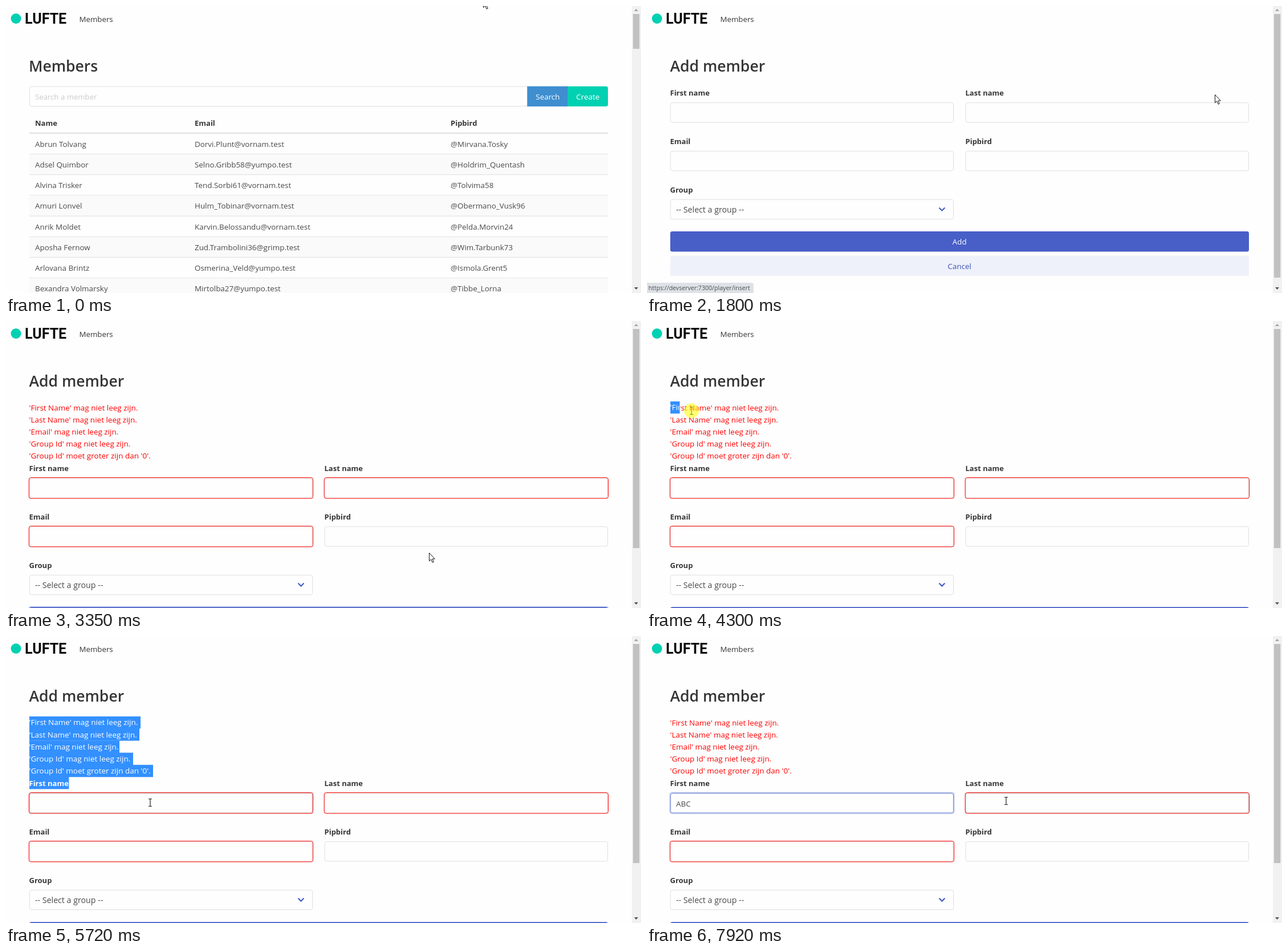
An HTML page for the animation above (7990 ms loop, 1114 px wide and 503 px high).

```html
<!DOCTYPE html>
<html lang="en">
<head>
<meta charset="utf-8">
<title>Members</title>
<style>
html, body { margin: 0; width: 100%; height: 100%; overflow: hidden; background: #fefefe; }
svg { display: block; }
text { font: 13.4px "Open Sans", "Noto Sans", sans-serif; fill: #4a4a4a; }
.b { font-weight: 700; font-size: 13px; fill: #363636; }
.title { font-weight: 600; font-size: 26.5px; fill: #363636; }
.brand { font: 700 25px Roboto, sans-serif; fill: #0a0a0a; }
.nav { font-size: 13.3px; fill: #363636; }
.hint { font-size: 13.2px; fill: #cacaca; }
.pick { font-size: 14.2px; }
.mid { text-anchor: middle; fill: #fff; }
.cancel { text-anchor: middle; fill: #3850b7; }
.err { font-size: 13.5px; fill: #f00; }
.sel { font-size: 13.5px; fill: #fff; }
.selb { font-weight: 700; font-size: 13px; fill: #fff; }
.url { font-size: 10.6px; fill: #4a4d51; }
</style>
</head>
<body>
<svg id="stage" width="1114" height="503" viewBox="0 0 1114 503"></svg>
<script>
// The page is shown at a zoom of ZOOM, so edges fall between pixels.
const LOOP = 7990, ZOOM = .884, BLUE = '#485fc7';
const ROW = 41 * ZOOM, LINE = 24 * ZOOM, H = 40 * ZOOM;
const LEFT = 40.8, COL2 = 558.7, WIDE = 1015.2, HALF = 497.3, TOP = 140.7, SHIFT = 5 * LINE;
const T = { status: 1270, form: 1730, statusOff: 2250, submit: 3210, errors: 3350,
  dragFrom: 4060, dragTo: 5250, focus: 5850 };

const people = [
  ['Abrun Tolvang', 'Dorvi.Plunt@vornam.test', '@Mirvana.Tosky'],
  ['Adsel Quimbor', 'Selno.Gribb58@yumpo.test', '@Holdrim_Quentash'],
  ['Alvina Trisker', 'Tend.Sorbi61@vornam.test', '@Tolvima58'],
  ['Amuri Lonvel', 'Hulm_Tobinar@vornam.test', '@Obermano_Vusk96'],
  ['Anrik Moldet', 'Karvin.Belossandu@vornam.test', '@Pelda.Morvin24'],
  ['Aposha Fernow', 'Zud.Trambolini36@grimp.test', '@Wim.Tarbunk73'],
  ['Arlovana Brintz', 'Osmerina_Veld@yumpo.test', '@Ismola.Grent5'],
  ['Bexandra Volmarsky', 'Mirtolba27@yumpo.test', '@Tibbe_Lorna']
];

// message, right edge of its selection
const messages = [
  ["'First Name' mag niet leeg zijn.", 236],
  ["'Last Name' mag niet leeg zijn.", 234],
  ["'Email' mag niet leeg zijn.", 199],
  ["'Group Id' mag niet leeg zijn.", 223],
  ["'Group Id' moet groter zijn dan '0'.", 258]
];

// pointer path: time, x, y
const path = [
  [0, 837, -12], [620, 837, -12], [800, 868, 110], [920, 910, 180], [990, 948, 194],
  [1130, 996, 155], [2040, 996, 155], [2550, 742, 406], [3490, 742, 406],
  [3690, 211, 131], [3850, 211, 131], [4050, 34, 144], [4150, 34, 144],
  [4650, 180, 188], [4720, 216, 195], [4920, 307, 241], [5290, 307, 241],
  [5490, 275, 322], [5700, 253, 292], [7540, 253, 292], [7720, 460, 277],
  [7920, 630, 289], [LOOP, 630, 289]
];

// mouse presses: from, to
const presses = [[1660, 1760], [T.submit, T.errors], [T.dragFrom, T.dragTo], [T.focus, 5925]];

const clamp = v => Math.max(0, Math.min(1, v));
const inside = (p, x, y, w, h) => p.x >= x && p.x < x + w && p.y >= y && p.y < y + h;

function pointerAt(t) {
  const i = Math.max(1, path.findIndex(k => k[0] > t));
  const [t0, x0, y0] = path[i - 1], [t1, x1, y1] = path[i];
  const k = clamp((t - t0) / (t1 - t0));
  return { x: x0 + (x1 - x0) * k, y: y0 + (y1 - y0) * k };
}

const text = (x, y, s, cls = '') => `<text x="${x}" y="${y}" class="${cls}">${s}</text>`;
const rect = (x, y, w, h, fill, extra = '') =>
  `<rect x="${x}" y="${y}" width="${w}" height="${h}" fill="${fill}" ${extra}/>`;
const frame = (x, y, w, h, color, line = ZOOM) =>
  rect(x + line / 2, y + line / 2, w - line, h - line, 'none',
    `stroke="${color}" stroke-width="${line}" rx="3.5"`);
const glow = (x, y, w) => frame(x - 1.8, y - 1.8, w + 3.6, H + 3.6, '#d1d7f1', 1.8);
const shape = (d, fill, extra = '') => `<path d="${d}" fill="${fill}" ${extra}/>`;

function field(x, y, p, { invalid, focus } = {}) {
  const hover = inside(p, x, y, HALF, H);
  let s = focus ? glow(x, y, HALF) : '';
  s += frame(x, y, HALF, H, focus ? BLUE : hover ? '#b5b5b5' : '#dbdbdb');
  if (invalid && !focus) s += frame(x - 1, y - 1, HALF + 2, H + 2, '#f00', 1);
  return s;
}

function chrome(thumbEnd) {
  return `<circle cx="17.5" cy="22" r="9" fill="#00d1b2"/>` +
    text(33, 31, 'LUFTE', 'brand') + text(128.5, 27.5, 'Members', 'nav') +
    rect(1098, 0, 16, 503, '#f1f1f1') +
    rect(1100, 14, 11.3, thumbEnd - 14, '#c1c1c1') +
    shape('M1102 9l3.5-4 3.5 4z', '#a3a3a3') + shape('M1102 493l3.5 4 3.5-4z', '#505050');
}

function listPage(p) {
  const search = 914.3, create = 985.2, right = LEFT + WIDE;
  const over = x => inside(p, x, TOP, 70.9, H);
  const green = over(create) ? '#00c4a7' : '#00d1b2';
  let s = chrome(75) + text(40, 115, 'Members', 'title') +
    frame(LEFT, TOP, search - LEFT + 3, H,
      inside(p, LEFT, TOP, search - LEFT, H) ? '#b5b5b5' : '#dbdbdb') +
    text(51, 164, 'Search a member', 'hint') +
    rect(create - 5, TOP, right - create + 5, H, green, 'rx="3.5"') +
    rect(search, TOP, create - search, H, over(search) ? '#3488ce' : '#3e8ed0') +
    text(950.4, 163.5, 'Search', 'mid') + text(1020.8, 163.5, 'Create', 'mid');
  const cols = [51, 331, 780];
  ['Name', 'Email', 'Pipbird'].forEach((h, i) => s += text(cols[i], 209.5, h, 'b'));
  people.forEach((row, r) => {
    const y = 223.6 + r * ROW;
    if (r % 2) s += rect(LEFT, y, WIDE, ROW, '#fafafa');
    s += rect(LEFT, y + ROW - ZOOM, WIDE, ZOOM, '#dbdbdb');
    row.forEach((c, i) => s += text(cols[i], y + 23, c));
  });
  return s + rect(LEFT, 221.9, WIDE, 2 * ZOOM, '#dbdbdb');
}

function selected(i, width, cls, s) {
  const h = LINE + .6;
  return `<svg x="${LEFT}" y="${TOP + i * LINE}" width="${width}" height="${h}">` +
    rect(0, 0, width, h, '#3390ff') + text(-.3, 15.8, s, cls) + '</svg>';
}

function selection(t) {
  if (t < T.dragFrom || t >= T.focus) return '';
  const head = pointerAt(Math.min(t - 70, 4920));
  const row = Math.floor((head.y - TOP) / LINE), all = head.y > 239;
  let s = '';
  messages.forEach(([m, end], i) => {
    const right = i < row || all ? end : i === row ? Math.min(end, head.x) : 0;
    if (right > LEFT) s += selected(i, right - LEFT, 'sel', m);
  });
  return all ? s + selected(5, 69.8, 'selb', 'First name') : s;
}

function formPage(t, p) {
  const invalid = t >= T.errors, dy = invalid ? SHIFT : 0, focus = t >= T.focus;
  let s = chrome(invalid ? 398 : 476) + text(40.5, 115, 'Add member', 'title');
  if (invalid) messages.forEach(([m], i) => s += text(40.5, 156.5 + i * LINE, m, 'err'));

  const label = (x, y, name) => text(x, y + dy, name, 'b');
  const y1 = 169 + dy, y2 = y1 + 96 * ZOOM, y3 = y2 + 96 * ZOOM;
  s += label(40.5, 156.5, 'First name') + label(558.5, 156.5, 'Last name') +
    label(40.5, 241.5, 'Email') + label(558.5, 241.5, 'Pipbird') + label(40.5, 326.5, 'Group') +
    field(LEFT, y1, p, { invalid, focus }) + field(COL2, y1, p, { invalid }) +
    field(LEFT, y2, p, { invalid }) + field(COL2, y2, p) + field(LEFT, y3, p) +
    text(51, 361.5 + dy, '-- Select a group --', 'pick') +
    shape(`M512.5 ${353.5 + dy}l5 5 5-5`, 'none', `stroke="${BLUE}" stroke-width="2.2"`);

  const y = 395.1 + dy, hover = inside(p, LEFT, y, WIDE, H), pressed = t >= T.submit && !invalid;
  if (t >= T.submit && t < T.dragFrom) s += glow(LEFT, y, WIDE);
  s += rect(LEFT, y, WIDE, H, pressed ? '#3a51bb' : hover ? '#3e56c4' : BLUE, 'rx="3.5"') +
    text(548.3, y + 23, 'Add', 'mid') +
    rect(LEFT, y + 48 * ZOOM, WIDE, H, '#eff1fa', 'rx="3.5"') +
    text(548.3, y + 65.4, 'Cancel', 'cancel');

  if (focus) {
    const typed = [6400, 6990, 7100].filter(k => t >= k).length;
    s += text(51, 298.5, 'ABC'.slice(0, typed));
    if (t < 7580) s += rect([52, 61, 69.5, 78][typed], 286, 1, 15, '#363636');
  }
  return s + selection(t);
}

function status(t) {
  if (t < T.status || t >= T.statusOff) return '';
  return `<g opacity="${clamp((t - T.status + 40) / 160)}">` +
    shape('M0 485h183q4 0 4 4v14H0z', '#dee1e6') +
    text(2.5, 498, 'https://devserver:7300/player/insert', 'url') + '</g>';
}

function cursorKind(t, p) {
  if (t < T.form) {
    if (inside(p, 914, TOP, 142, H)) return 'hand';
    return inside(p, LEFT, TOP, 873, H) ? 'beam' : 'arrow';
  }
  const failed = t >= T.errors, dy = failed ? SHIFT : 0;
  if (inside(p, LEFT, 395 + dy, WIDE, H)) return 'hand';
  const onField = [LEFT, COL2].some(x => [169, 254].some(y => inside(p, x, y + dy, HALF, H)));
  const onText = failed && messages.some(([, end], i) =>
    inside(p, LEFT, TOP + i * LINE, end - LEFT, LINE));
  return onField || onText ? 'beam' : 'arrow';
}

const cursors = {
  arrow: shape('M.5.5v14.2l3.2-3 2.4 5.5 2.2-1-2.4-5.2h4.4z', '#fff', 'stroke="#111"'),
  hand: shape('M.5 1.8a1.7 1.7 0 0 1 3.4 0v5l5 1.3q2 .6 1.8 2.8l-.7 4.4-1.2 3h-6.8l-1.2-2.4-4.6-5.2q-.8-1.6.8-2l2.5 1.6z',
    '#fff', 'stroke="#111" stroke-linejoin="round"'),
  beam: shape('M-3-6.5h2.2l.8.8.8-.8H3M0-6V6M-3 6.5h2.2L0 5.7l.8.8H3', 'none', 'stroke="#222" stroke-width="1.2"')
};

function pointer(t, p) {
  const down = presses.some(([a, b]) => t >= a && t < b);
  return `<g transform="translate(${p.x.toFixed(1)} ${p.y.toFixed(1)})">` +
    cursors[cursorKind(t, p)] +
    (down ? '<circle r="13" fill="#ff0" fill-opacity=".55"/>' : '') + '</g>';
}

const stage = document.getElementById('stage');
let last = '';
function draw() {
  const t = performance.now() % LOOP, p = pointerAt(t);
  const s = (t < T.form ? listPage(p) : formPage(t, p)) + status(t) + pointer(t, p);
  if (s !== last) stage.innerHTML = last = s;
  requestAnimationFrame(draw);
}
draw();
</script>
</body>
</html>
```
